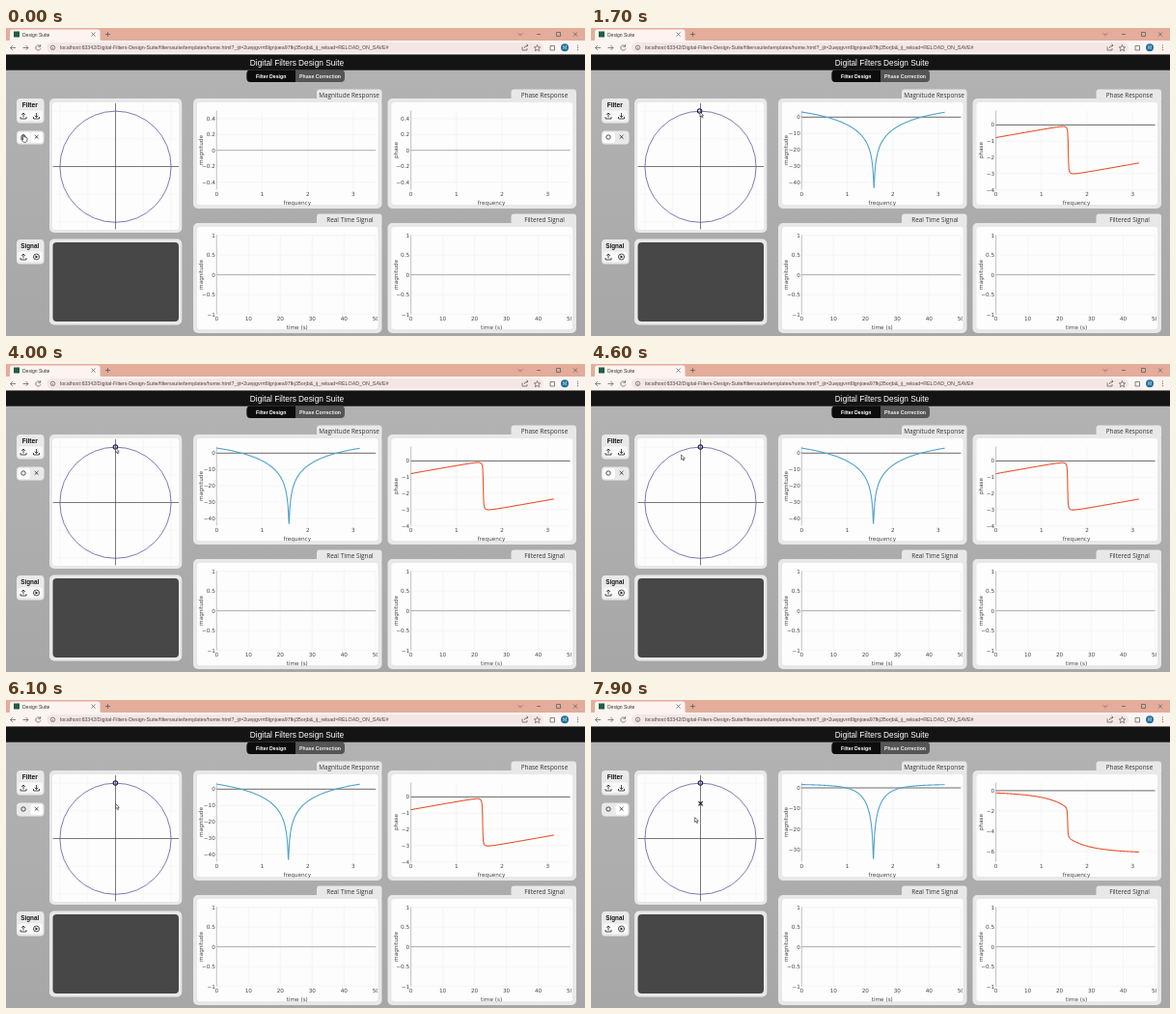
An HTML page for the animation above (8 s loop, 600 px wide and 319 px high).

```html
<!DOCTYPE html>
<html lang="en">
<head>
<meta charset="utf-8">
<title>Design Suite</title>
<style>
html, body { margin: 0; width: 100%; height: 100%; overflow: hidden; background: #aeaeae; }
svg { display: block; width: 600px; height: 319px; }
text { font-family: "Liberation Sans", Arial, sans-serif; }
.plot text { font: 5.7px "DejaVu Sans", Verdana, sans-serif; fill: #444; }
.tab { font: 6.4px "Open Sans", sans-serif; fill: #333; }
.bold { font-weight: 700; }
.mid { text-anchor: middle; }
.icon { fill: none; stroke: #222; stroke-width: .8; }
.chrome { fill: none; stroke: #555; stroke-width: .7; }
</style>
</head>
<body>
<svg id="stage" viewBox="0 0 600 319"></svg>
<script>
const LOOP = 8000;
const stage = document.getElementById("stage");

const rect = (x, y, w, h, fill, r = 0) =>
  `<rect x="${x}" y="${y}" width="${w}" height="${h}" rx="${r}" fill="${fill}"/>`;
const line = (x1, y1, x2, y2, color, width = .7) =>
  `<path d="M${x1} ${y1}L${x2} ${y2}" stroke="${color}" stroke-width="${width}"/>`;
const text = (x, y, s, attrs = "") => `<text x="${x}" y="${y}" ${attrs}>${s}</text>`;
const icon = (d, kind = "icon") => `<path class="${kind}" d="${d}"/>`;

function browserBar() {
  const url = "localhost:63342/Digital-Filters-Design-Suite/filterssuite/templates/home.html" +
    "?_ijt=2uepgvrrt6lgnjoea97fkj35orjb&amp;_ij_reload=RELOAD_ON_SAVE#";
  return rect(0, 0, 600, 14, "#e3ac9b") +
    `<path d="M2 14Q4 14 4 11V4Q4 1.5 6.500 1.500H95Q97.500 1.500 97.500 4V11Q97.500 14 100 14Z" fill="#fdf4f1"/>` +
    rect(0, 13, 600, 14.5, "#fdf4f1") +
    rect(42, 15, 515, 10.5, "#f4e7e3", 5.2) +
    rect(8, 3.5, 6, 6, "#1f5f3f") +
    text(17, 8.5, "Design Suite", 'font-size="5" fill="#333"') +
    text(56, 22.2, url, 'font-size="5.3" fill="#444"') +
    icon("M88.500 4.500l4 4m0-4l-4 4M103 6.500h5m-2.500-2.500v5M531 5.500l2 2 2-2M550 6.500h4M570.500 4.500h4v4h-4zM588 4.500l4 4m0-4l-4 4" +
      "M10 20.500H4.500m2.500-2.500l-2.500 2.500 2.500 2.500M17.500 20.500H23m-2.500-2.500l2.500 2.500-2.500 2.500" +
      "M35.500 19a2.600 2.600 0 1 0 .4 2.200M35.700 17v2.300h-2.300M535 19.500v3.500h5v-2M537 21q.500-3 4-3m-1.500-1.500l1.500 1.500-1.500 1.500" +
      "M550.500 17.500l1 2.200 2.200.2-1.700 1.500.6 2.300-2.100-1.200-2.100 1.200.6-2.300-1.700-1.500 2.200-.2zM564 18.500h4.500v4.500h-4.500z", "chrome") +
    `<circle cx="48.500" cy="20.300" r="2.200" class="chrome"/><path d="M48.500 20v1.500" class="chrome"/>` +
    `<circle cx="579" cy="20.300" r="4" fill="#1f6f9c"/>` +
    text(579, 22, "M", 'class="mid" font-size="4.500" fill="#fff"') +
    [18, 20.3, 22.6].map(y => `<circle cx="592.500" cy="${y}" r=".6" fill="#555"/>`).join("");
}

function header() {
  return rect(0, 27.5, 600, 16.2, "#141414") +
    text(301.5, 38.8, "Digital Filters Design Suite", 'class="mid" font-size="8.300" fill="#fff"') +
    rect(249.5, 43.5, 101.5, 12.5, "#555", 4) +
    `<path d="M300 43.500H253.500a4 4 0 0 0-4 4V52a4 4 0 0 0 4 4H300Z" fill="#0c0c0c"/>` +
    text(274.7, 51.6, "Filter Design", 'class="mid bold" font-size="5.200" fill="#fff"') +
    text(325.5, 51.6, "Phase Correction", 'class="mid bold" font-size="5.200" fill="#eee"');
}

const tray = (x, y, down) => icon(`M${x - 3} ${y + 1}v2h6v-2M${x} ${y + 1.5}v-4.500` +
  (down ? `m-1.800 2.700l1.800 1.800 1.800-1.800` : `m-1.800 1.800l1.800-1.800 1.800 1.800`));

function sidePanels() {
  return rect(11, 73, 28.5, 25.5, "#e9e9e9", 4) + rect(11, 219, 28.5, 25.5, "#e9e9e9", 4) +
    text(24.7, 81.5, "Filter", 'class="mid bold" font-size="6.600" fill="#111"') +
    text(24.7, 227.6, "Signal", 'class="mid bold" font-size="6.300" fill="#111"') +
    rect(12.5, 85.5, 25.5, 10.5, "#f8f8f8", 3) + rect(12.5, 231.5, 25.5, 10.5, "#f8f8f8", 3) +
    tray(18, 91, false) + tray(31.5, 91, true) + tray(18, 237, false) +
    `<circle cx="31.500" cy="237" r="3" class="icon"/><path d="M30.500 235.300l2.700 1.700-2.700 1.700z" fill="#222"/>` +
    rect(11, 106.500, 28.5, 14, "#e9e9e9", 4) +
    `<g id="zeroBtn">${rect(12.5, 108, 12.3, 11, "#fff", 2.5)}</g>` +
    `<g id="poleBtn">${rect(25.6, 108, 12.3, 11, "#fff", 2.5)}</g>` +
    `<circle cx="18" cy="113" r="2.200" class="icon"/>` + icon("M29.700 110.900l3.800 3.800m0-3.800l-3.800 3.800");
}

function circleCard() {
  let grid = "";
  for (let i = -2; i <= 2; i++) {
    grid += line(113.5 + i * 28.7, 78, 113.5 + i * 28.7, 208, "#f4f4f4") +
      line(49, 143.5 + i * 28.7, 179, 143.5 + i * 28.7, "#f4f4f4");
  }
  return rect(45, 73, 137.3, 139, "#e8e8e8", 5) + rect(48, 77, 131.3, 132, "#fdfdfd", 3) + grid +
    line(48.5, 143.5, 179, 143.5, "#444") + line(113.5, 78, 113.5, 208.5, "#444") +
    `<circle cx="113.500" cy="143.700" r="57.600" fill="none" stroke="#5a5aa8" stroke-width=".8"/>` +
    rect(45, 218.5, 137.3, 89, "#e8e8e8", 5) + rect(48.5, 222, 130.5, 82, "#474747", 4);
}

function card(x, y, title) {
  return rect(x + 128, y - 9.5, 67.5, 14, "#e8e8e8", 3) + rect(x, y, 195.5, 114, "#e8e8e8", 5) +
    rect(x + 4, y + 4, 187.5, 106, "#fdfdfd", 3) +
    text(x + 158.5 + (title[0] === "M" ? 3 : 4), y - 1.2, title, 'class="tab mid"');
}

// Axes, grid and labels. y = { zero, unit, ticks }, x = { unit, ticks }
function axes(left, top, bottom, x, y, xName, yName, zeroColor, clip) {
  const right = left + 165;
  let grid = "", labels = "";
  for (const v of x.ticks) {
    const px = left + v * x.unit;
    if (v) grid += line(px, top, px, bottom, "#f2f2f2");
    labels += text(px, bottom + 6, v, 'class="mid"');
  }
  for (const v of y.ticks) {
    const py = y.zero - v * y.unit;
    if (v) grid += line(left, py, right, py, "#f2f2f2");
    labels += text(left - 1.5, py + 2, String(v).replace("-", "−"), 'text-anchor="end"');
  }
  const mid = (top + bottom) / 2;
  return `<g class="plot" clip-path="url(#${clip})">${grid}` +
    line(left, top, left, bottom, "#aaa") + line(left, y.zero, right, y.zero, zeroColor, .8) + labels +
    text(left + 83.5, bottom + 15.2, xName, 'class="mid"') +
    `<text class="mid" transform="translate(${left - 14} ${mid}) rotate(-90)">${yName}</text></g>`;
}

const polar = (r, a) => [r * Math.cos(a), r * Math.sin(a)];

// Frequency response of one zero and an optional pole, phase unwrapped
function response(zero, pole) {
  const parts = pole ? [[zero, 1], [pole, -1]] : [[zero, 1]];
  const last = [], out = [], n = 500;
  for (let i = 0; i <= n; i++) {
    const w = Math.PI * i / n;
    let db = 0, phase = 0;
    parts.forEach(([[a, b], sign], k) => {
      const re = Math.cos(w) - a, im = Math.sin(w) - b;
      let arg = Math.atan2(im, re);
      if (i) arg -= 2 * Math.PI * Math.round((arg - last[k]) / (2 * Math.PI));
      last[k] = arg;
      db += sign * 20 * Math.log10(Math.hypot(re, im));
      phase += sign * arg;
    });
    out.push({ w, db, phase });
  }
  return out;
}

const freq = { unit: 47.2, ticks: [0, 1, 2, 3] };
const time = { unit: 3.3, ticks: [0, 10, 20, 30, 40, 50] };
const MAG_X = 218.3, PHASE_X = 419.6;

function responsePlots(id, mag, phase, zeroColor, data) {
  const curve = (left, key, y, color) => `<path fill="none" stroke="${color}" stroke-width="1.100" stroke-linejoin="round" d="M` +
    data.map(p => (left + p.w * freq.unit).toFixed(2) + " " + (y.zero - p[key] * y.unit).toFixed(2)).join("L") + `"/>`;
  return `<g id="${id}">` +
    axes(MAG_X, 85.5, 167.5, freq, mag, "frequency", "magnitude", zeroColor, "leftClip") +
    axes(PHASE_X, 85.5, 167.5, freq, phase, "frequency", "phase", zeroColor, "rightClip") +
    (data ? curve(MAG_X, "db", mag, "#4fa3cd") + curve(PHASE_X, "phase", phase, "#e9552f") : "") + `</g>`;
}

function plots() {
  const flat = { zero: 126.7, unit: 82, ticks: [.4, .2, 0, -.2, -.4] };
  const magZero = { zero: 92.3, unit: 1.69, ticks: [0, -10, -20, -30, -40] };
  const phaseZero = { zero: 100.4, unit: 16.8, ticks: [0, -1, -2, -3, -4] };
  const magPole = { zero: 91, unit: 2.14, ticks: [0, -10, -20, -30] };
  const phasePole = { zero: 93.9, unit: 10.5, ticks: [0, -2, -4, -6] };
  const signal = { zero: 255.6, unit: 41, ticks: [1, .5, 0, -.5, -1] };
  const moved = polar(1.0067, 1.575);
  return card(194, 73, "Magnitude Response") + card(395.5, 73, "Phase Response") +
    card(194, 202, "Real Time Signal") + card(395.5, 202, "Filtered Signal") +
    responsePlots("empty", flat, flat, "#999") +
    responsePlots("first", magZero, phaseZero, "#444", response(polar(1.0067, 1.588))) +
    responsePlots("second", magZero, phaseZero, "#444", response(moved)) +
    responsePlots("third", magPole, phasePole, "#444", response(moved, [0, .635])) +
    axes(MAG_X, 214.5, 296.5, time, signal, "time (s)", "magnitude", "#999", "leftClip") +
    axes(PHASE_X, 214.5, 296.5, time, signal, "time (s)", "magnitude", "#999", "rightClip");
}

const markers =
  `<circle id="zero" r="2.200" fill="none" stroke="#1c1c3c" stroke-width="1.100"/>` +
  `<path id="pole" d="M111.500 105.200l4.200 4.200m0-4.200l-4.200 4.200" stroke="#111" stroke-width="1.100"/>` +
  `<path id="arrow" d="M0 0V5L1.200 4L2.100 6L3 5.600L2.100 3.700H3.700Z" fill="#fff" stroke="#222" stroke-width=".6"/>` +
  `<path id="hand" d="M-.7 3V-2.500Q0-3.600.7-2.500V0Q1.500-.6 2 .2Q2.800-.2 3.100.6Q3.900.3 4 1.200V3Q3.800 4.800 2.800 5.300H.4Q-.8 4.500-2.400 2Q-2-.1-.7 1.200Z" fill="#fff" stroke="#222" stroke-width=".7"/>`;

stage.innerHTML =
  `<defs><linearGradient id="page" x2="0" y2="1"><stop stop-color="#b3b3b3"/><stop offset="1" stop-color="#a7a7a7"/></linearGradient>` +
  `<clipPath id="leftClip">${rect(198, 77, 187, 240, "#000")}</clipPath>` +
  `<clipPath id="rightClip">${rect(399.5, 77, 186.5, 240, "#000")}</clipPath></defs>` +
  rect(0, 27, 600, 292, "url(#page)") + browserBar() + header() + sidePanels() + circleCard() + plots() + markers;

// Pointer path: time, x, y
const path = [
  [0, 18, 113], [250, 18, 113], [1000, 113, 87], [3700, 113, 87], [3900, 113.6, 87],
  [4400, 113.6, 87], [5000, 37, 114], [5400, 37, 114], [6000, 113.800, 107.800],
  [6400, 113, 107], [6800, 113, 107], [7400, 107.600, 121.600], [LOOP, 107.600, 121.600]
];

function pointer(t) {
  const i = path.findIndex(p => p[0] > t);
  const [t0, x0, y0] = path[i - 1], [t1, x1, y1] = path[i];
  const u = (t - t0) / (t1 - t0), e = u * u * (3 - 2 * u);
  return [x0 + (x1 - x0) * e, y0 + (y1 - y0) * e];
}

const el = id => document.getElementById(id);
const show = (id, on) => el(id).setAttribute("visibility", on ? "visible" : "hidden");

function draw(t) {
  const [x, y] = pointer(t);
  const onButtons = x < 39.5;
  for (const id of ["arrow", "hand"]) el(id).setAttribute("transform", `translate(${x} ${y})`);
  show("hand", onButtons);
  show("arrow", !onButtons);
  show("empty", t < 1200);
  show("first", t >= 1200 && t < 4200);
  show("second", t >= 4200 && t < 6500);
  show("third", t >= 6500);
  show("zero", t >= 1200);
  el("zero").setAttribute("transform", `translate(${t < 3800 ? 112.6 : 113.4} 86)`);
  show("pole", t >= 6500);
  show("zeroBtn", t < 5400);
  show("poleBtn", t < 200 || t >= 4900);
}

const start = performance.now();
function tick() {
  draw((performance.now() - start) % LOOP);
  requestAnimationFrame(tick);
}
draw(0);
tick();
</script>
</body>
</html>
```
